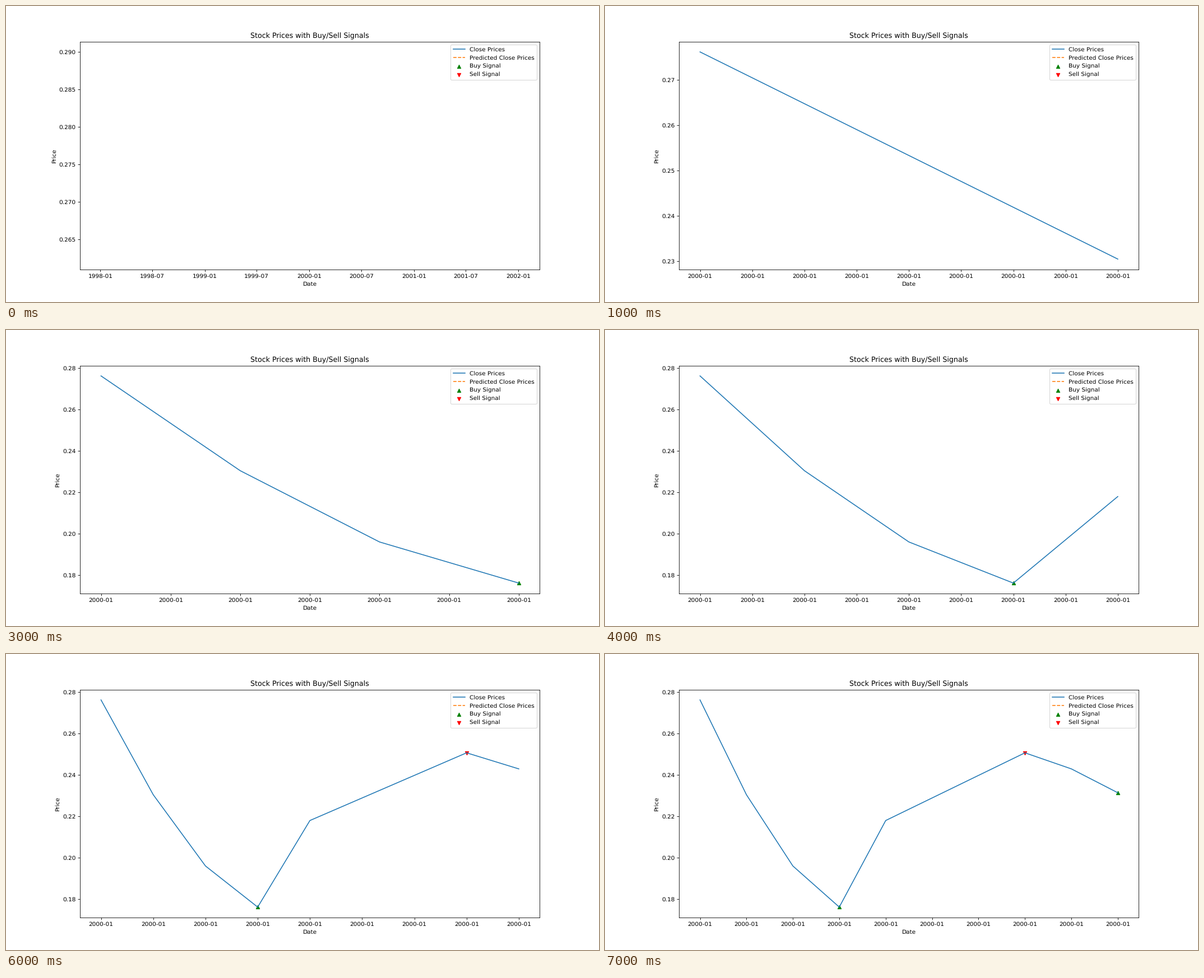
A matplotlib script that plays this animation: 1058x529 px, repeating every 8 s.

```python
import numpy as np
import matplotlib.pyplot as plt
from matplotlib.animation import FuncAnimation
from matplotlib.dates import DateFormatter

plt.rcParams["text.hinting"] = "none"

# Key prices on consecutive trading days; the calendar skips the weekend.
close = np.array([0.27617, 0.23044, 0.19608, 0.17625,
                  0.21800, 0.25065, 0.24290, 0.23140])
day = np.arange(len(close))
dates = np.busday_offset("2000-01-03", day)

# Buy and sell signals alternate every second day from the first low.
low = close.argmin()
buys = (day >= low) & ((day - low) % 4 == 0)
sells = (day >= low) & ((day - low) % 4 == 2)

fig, ax = plt.subplots(figsize=(14, 7), dpi=75.5714286)
fig.subplots_adjust(top=0.8799)


def signal(mask, last, marker, color, label):
    shown = mask & (day <= last)
    ax.scatter(dates[shown], close[shown], marker=marker, color=color, label=label)


def draw(last):
    ax.clear()
    ax.plot(dates[:last + 1], close[:last + 1], label="Close Prices")
    ax.plot(dates[:0], close[:0], "--", label="Predicted Close Prices")
    signal(buys, last, "^", "green", "Buy Signal")
    signal(sells, last, "v", "red", "Sell Signal")
    ax.xaxis.set_major_formatter(DateFormatter("%Y-%m"))
    ax.set_title("Stock Prices with Buy/Sell Signals")
    ax.set_xlabel("Date")
    ax.set_ylabel("Price")
    ax.legend(loc="upper right")
    return []


anim = FuncAnimation(fig, draw, frames=len(close), init_func=lambda: draw(0),
                     interval=1000, repeat=True, repeat_delay=0)
plt.show()
```
